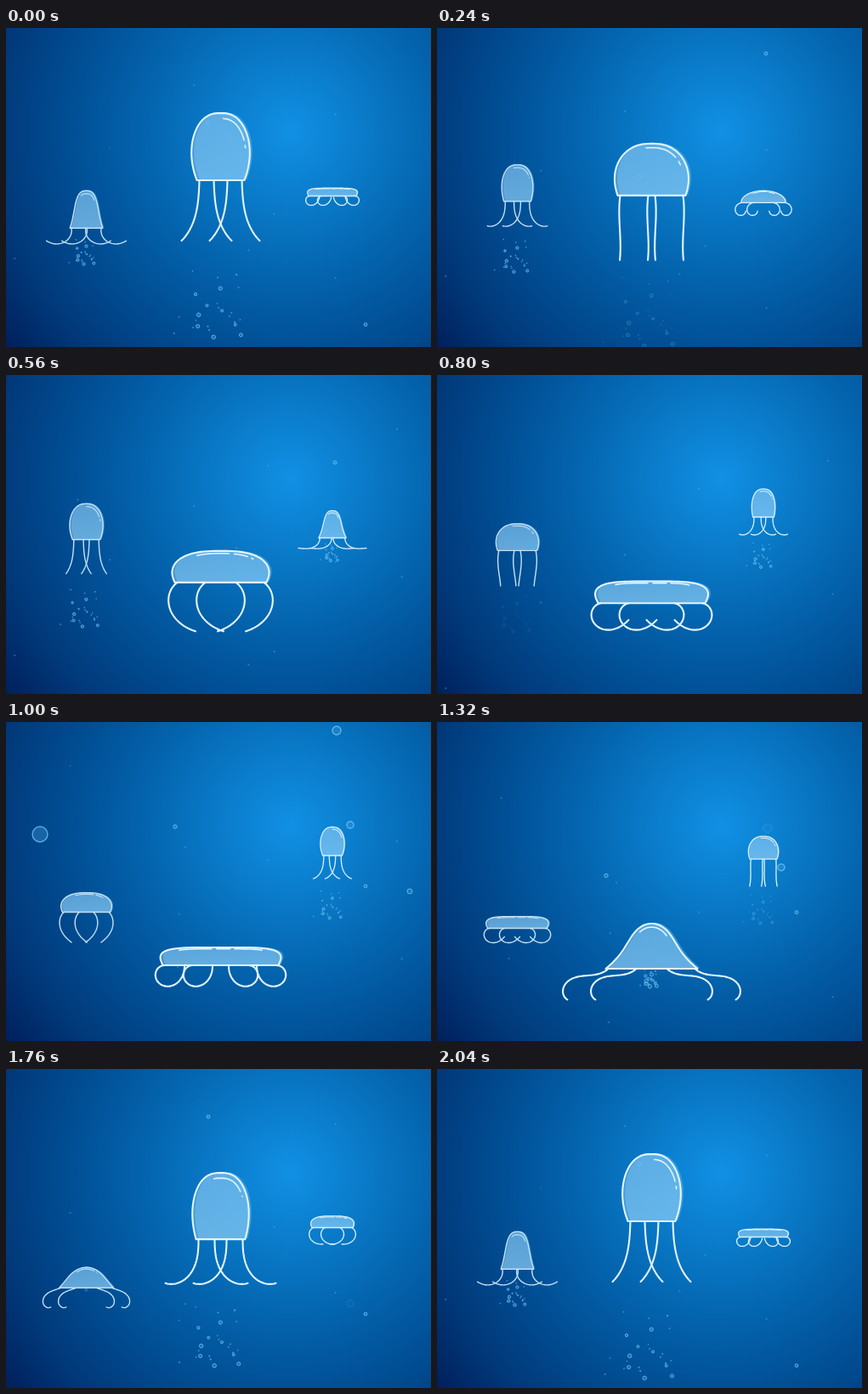
An HTML page with a canvas for the animation above (2.08 s loop, 500 by 375 pixels).

```html
<!DOCTYPE html>
<html lang="en">
<head>
<meta charset="utf-8">
<title>Jellyfish</title>
<style>
html, body { margin: 0; width: 100%; height: 100%; overflow: hidden; background: #02539a; }
canvas { display: block; }
</style>
</head>
<body>
<canvas id="sea" width="500" height="375"></canvas>
<script>
const ctx = document.getElementById('sea').getContext('2d');
const STEP = 40, FRAMES = 52, CYCLE = 2040;
const ARM_LENGTH = 76, ARM_GAP = 33;

// One swimming stroke: phase, base y, base half width, body half width, height,
// squareness, arm heading at root, middle and tip (degrees outward from straight down)
const stroke = [
  [0, 179, 28, 38, 79, 2.5, 2, 13, 45],
  [.118, 197, 40, 47, 61, 2.4, 8, -3, 6],
  [.275, 244, 54, 60, 37, 2.7, 55, -25, -72],
  [.49, 286, 68, 72, 21, 4.5, 95, -82, -182],
  [.568, 298, 62, 64, 33, 2, 90, -27, -175],
  [.647, 290, 54, 32, 53, 2.1, 45, 77, -60],
  [.75, 256, 35, 26, 80, 2.8, -12, 66, 122],
  [.863, 200, 29, 36, 78, 2.6, 0, 30, 108]
];

const jellies = [
  { x: 94.5, y: 94.5, size: .55, shift: -.25, line: 1.4, color: '#c3e2f5' },
  { x: 384, y: 80.2, size: .42, shift: .453, line: 1.35, color: '#d5effd' },
  { x: 252.5, y: 0, size: 1, shift: 0, line: 2.1, color: '#e3f5ff' }
];

// Large bubbles: x, y, time at y, speed, radius
const bubbles = [
  [238, 56, 1760, .17, 2], [387, 30, 240, .19, 2],
  [389, 10, 1000, .3, 5], [405, 121, 1000, .13, 4],
  [423, 193, 1000, .08, 1.9], [475, 199, 1000, .35, 3],
  [40, 132, 1000, .5, 9], [199, 123, 1000, .15, 2.2]
];
const rnd = random(90);
for (let i = 0; i < 16; i++) {
  bubbles.push([rnd() * 480 + 10, rnd() * 300 + 20, rnd() * CYCLE, .06 + rnd() * .06, 1]);
}

const wrap = v => v - Math.floor(v);
const clamp = v => Math.max(0, Math.min(1, v));
const mirror = pts => pts.map(([x, y]) => [-x, y]);

function random(seed) {
  return () => (seed = (seed * 16807) % 2147483647) / 2147483647;
}

// Cubic interpolation through the cyclic key poses
function pose(p) {
  const n = stroke.length;
  const row = j => stroke[(j + n) % n];
  const time = j => row(j)[0] + Math.floor(j / n);
  let i = n - 1;
  while (stroke[i][0] > p) i--;
  const span = time(i + 1) - time(i), u = (p - time(i)) / span, w = 1 - u;
  const slope = (j, k) => (row(j + 1)[k] - row(j - 1)[k]) / (time(j + 1) - time(j - 1)) * span;
  return row(i).map((a, k) =>
    a * (1 + 2 * u) * w * w + slope(i, k) * u * w * w
    + row(i + 1)[k] * u * u * (3 - 2 * u) - slope(i + 1, k) * u * u * w).slice(1);
}

// Superellipse dome whose foot is pinched or flared to the base width
function domePath(base, body, h, e) {
  const side = [], n = 28;
  for (let i = 0; i <= n; i++) {
    const a = i / n * Math.PI / 2;
    const up = Math.sin(a) ** (2 / e), cap = Math.max(0, Math.cos(a)) ** (2 / e);
    side.push([cap * (body + (base - body) * (1 - up) ** 3), -h * up]);
  }
  return [...mirror(side), ...side.reverse()];
}

// Walks along an arm whose heading changes quadratically
function armPath(x, from, mid, to) {
  const pts = [[x, 0]], n = 32;
  let y = 0;
  for (let i = 0; i < n; i++) {
    const s = (i + .5) / n;
    const a = (from + (4 * mid - 3 * from - to) * s + 2 * (from - 2 * mid + to) * s * s) * Math.PI / 180;
    x -= Math.sin(a) * ARM_LENGTH / n;
    y += Math.cos(a) * ARM_LENGTH / n;
    pts.push([x, y]);
  }
  return pts;
}

function trace(pts, dx = 0, dy = 0) {
  ctx.beginPath();
  for (const [x, y] of pts) ctx.lineTo(x + dx, y + dy);
}

function bubble(x, y, r, alpha) {
  ctx.globalAlpha = alpha;
  ctx.beginPath();
  ctx.arc(x, y, r, 0, 7);
  ctx.fillStyle = r < 1.2 ? '#5db4ea' : 'rgba(70,165,228,.4)';
  ctx.fill();
  if (r >= 1.2) {
    ctx.lineWidth = r > 3 ? 1.4 : 1;
    ctx.strokeStyle = '#71c3f3';
    ctx.stroke();
  }
  ctx.globalAlpha = 1;
}

function water() {
  const g = ctx.createRadialGradient(335, 122, 0, 335, 122, 430);
  ['#1190e4', '#0a7bc9', '#0464ae', '#014f95', '#013a7b', '#001c58']
    .forEach((color, i) => g.addColorStop(i / 5, color));
  ctx.fillStyle = g;
  ctx.fillRect(0, 0, 500, 375);
}

// Bubbles sink past the swimmers, ever faster
function drift(ms) {
  const k = .0011;
  for (const [x, y, t, v, r] of bubbles) {
    const life = Math.min(1100, 100 / v);
    for (const lap of [-1, 0, 1]) {
      const dt = ms - t + lap * CYCLE;
      if (dt < -160 || dt > life) continue;
      const alpha = clamp((dt + 160) / 160) * clamp((life - dt) / 60);
      bubble(x, y + v / k * (Math.exp(k * dt) - 1), r, alpha * (r > 1 ? .8 : .5));
    }
  }
}

// Bubbles pushed out below the dome by each stroke
function burst(j, p) {
  const q = wrap(p - .61);
  if (q > .55) return;
  const rnd = random(4711), spread = 1 - Math.exp(-7 * q);
  const alpha = clamp(q / .04) * clamp((.55 - q) / .12) * .8;
  for (let i = 0; i < 24; i++) {
    const dx = (rnd() + rnd() - 1) * 58, dy = (rnd() + rnd() - 1) * 58;
    const r = (.7 + rnd() ** 2 * 1.8) * (.45 + .55 * j.size);
    const x = j.x + j.size * (dx - 12) * spread;
    const y = j.y + j.size * (300 + dy * spread + 80 * q);
    bubble(x, y, Math.max(.8, r), alpha);
  }
}

function jelly(j, p) {
  const [y, base, body, h, square, from, mid, to] = pose(p);
  const dome = domePath(base, body, h, square);

  ctx.save();
  ctx.translate(j.x, j.y + j.size * y);
  ctx.scale(j.size, j.size);
  ctx.lineCap = ctx.lineJoin = 'round';
  ctx.lineWidth = j.line / j.size;
  ctx.strokeStyle = j.color;

  for (const gap of [0, ARM_GAP]) {
    const arm = armPath(3 - base + gap, from, mid, to);
    for (const pts of [arm, mirror(arm)]) {
      trace(pts);
      ctx.stroke();
    }
  }

  trace(dome, 3, -1);
  ctx.fillStyle = 'rgba(100,185,242,.5)';
  ctx.fill();
  const g = ctx.createLinearGradient(0, -h, 0, 0);
  g.addColorStop(0, 'rgba(150,205,242,.38)');
  g.addColorStop(1, 'rgba(160,215,250,.45)');
  trace(dome);
  ctx.fillStyle = g;
  ctx.fill();
  ctx.closePath();
  ctx.stroke();

  // Broken highlight along the inside of the rim
  const flat = Math.sin(Math.PI * p), n = dome.length;
  const rim = dome.slice(Math.round(n * (.52 - .22 * flat)), Math.round(n * (.86 - .16 * flat)))
    .map(([x, y]) => [x * .86, y * .9 - h * .02]);
  trace(rim);
  ctx.lineWidth *= .75;
  ctx.setLineDash([38, 6, 16, 5]);
  ctx.stroke();
  ctx.restore();
}

function draw(ms) {
  water();
  for (const j of jellies) {
    const p = wrap(ms / CYCLE + j.shift);
    burst(j, p);
    jelly(j, p);
  }
  drift(ms);
}

const start = performance.now();
function tick() {
  const step = Math.floor(Math.max(0, performance.now() - start) / STEP) % FRAMES;
  draw(step * STEP % CYCLE);
  requestAnimationFrame(tick);
}
tick();
</script>
</body>
</html>
```
